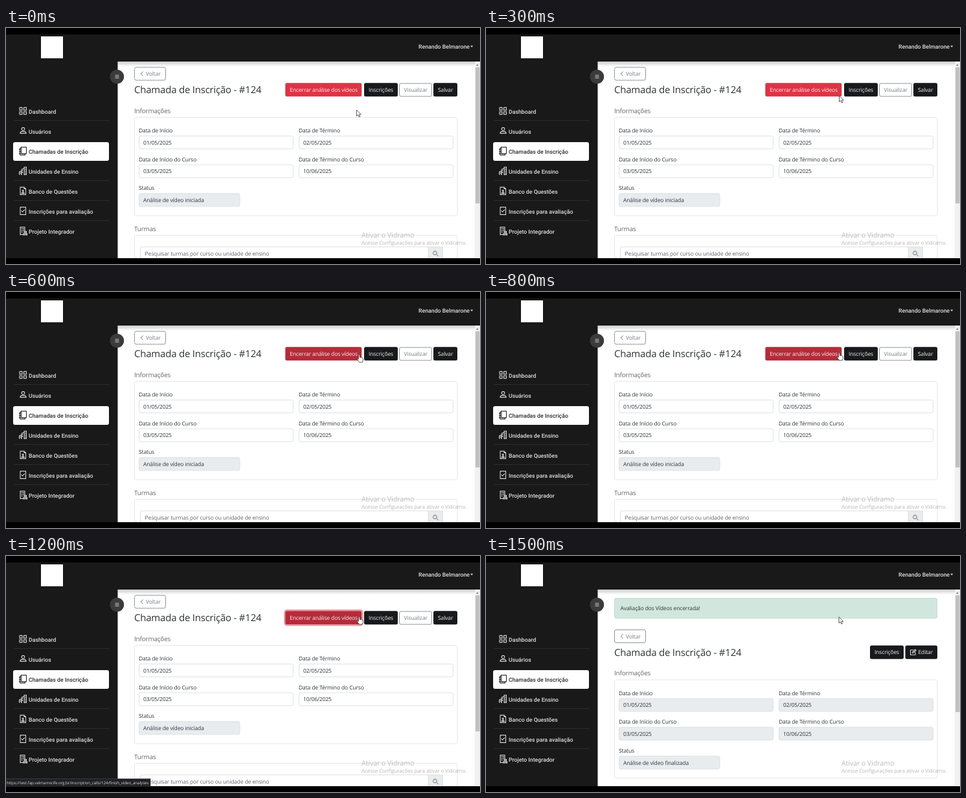
Write an HTML page that moves like this. It is 732x366 px and loops after 2700 ms.

```html
<!DOCTYPE html>
<html lang="pt-BR">
<head>
<meta charset="utf-8">
<style>
html, body { margin: 0; width: 100%; height: 100%; overflow: hidden; background: #000; }
svg { display: block; width: 732px; height: 366px; }
text { font: 8.5px "Open Sans", "Noto Sans", sans-serif; letter-spacing: -.015em; fill: #2f3337; text-rendering: geometricPrecision; white-space: pre; }
.nav text, .user { font: 500 8.75px Roboto, "Liberation Sans", sans-serif; letter-spacing: 0; fill: #e0e0e0; }
.nav text.on { fill: #2a2a2a; }
.icon { fill: none; stroke: #d4d4d4; stroke-width: 1.1; stroke-linejoin: round; stroke-linecap: round; }
.icon.on { stroke: #2a2a2a; }
.icon.thin { stroke: #666; stroke-width: .9; }
.cursor { fill: #fff; stroke: #333; stroke-width: .8; stroke-linejoin: round; }
</style>
</head>
<body>
<svg id="stage" viewBox="0 0 732 366"></svg>
<script>
const text = (x, y, s, attrs = '') => `<text x="${x}" y="${y}" ${attrs}>${s}</text>`;
const rect = (x, y, w, h, fill, attrs = '') =>
  `<rect x="${x}" y="${y}" width="${w}" height="${h}" fill="${fill}" ${attrs}/>`;
const path = (d, attrs = '') => `<path d="${d}" ${attrs}/>`;
const styled = css => `style="${css}"`;

const button = (x, y, w, label, fill, pad = 7) =>
  rect(x, y, w, 21, fill, 'rx="2.5"') + text(x + pad, y + 13.6, label, styled('fill:#f4f4f4'));
const outlined = (x, y, w, label, pad) =>
  rect(x, y, w, 20, '#fff', 'rx="2.5" stroke="#90959a"') + text(x + pad, y + 13, label, styled('fill:#747c83'));
const field = (x, y, w, label, value, locked) =>
  text(x, y, label) +
  rect(x + .5, y + 5.5, w, 20, locked ? '#e9ecef' : '#fff', 'rx="2.5" stroke="#dde1e5"') +
  text(x + 7, y + 18.7, value);

const items = [
  ['Dashboard', 'M1 1h4v4h-4zM7.5 1h4v4h-4zM1 7.5h4v4h-4zM7.5 7.5h4v4h-4z'],
  ['Usuários', 'M6.5 1a2.3 2.3 0 1 1 0 4.6a2.3 2.3 0 1 1 0-4.6zM2 10q0-3 3-3h3q3 0 3 3z'],
  ['Chamadas de Inscrição', 'M3.5.5h8v10h-8zM3 2H1.5v10.5h8V11M.5 4h2M.5 7h2M.5 10h2'],
  ['Unidades de Ensino', 'M.5 12V7.5l3-1V12M4 12V4l4-2V12M8 12V.5h3.5V12zM5.5 5v1M5.5 8v1M9.7 3v1M9.7 6v1M9.7 9v1M2 9v1'],
  ['Banco de Questões', 'M2 .5h6l2.5 2.5v9H2zM8 .5V3h2.5M6.2 5a1 1 0 1 1 0 2a1 1 0 1 1 0-2zM4 10q2.2-3 4.4 0z'],
  ['Inscrições para avaliação', 'M2 .5h8.5v11.5H2zM4 6.2l1.6 1.6L8.7 4.5'],
  ['Projeto Integrador', 'M2 12V.5h7V6M4 3h1M6.5 3h1M4 5.5h1M6.5 5.5h1M4 8h1M2 12h4M8 7h3.5v2H8zM7 10.5h2v2H7zM10.5 10.5h2v2h-2z'],
];

const sidebar = '<g class="nav">' + items.map(([label, d], i) => {
  const y = 130 + 31 * i, on = i === 2 ? 'on' : '';
  return (on ? rect(11, 177, 148, 29, '#fff', 'rx="3"') : '') +
    (i === 1 || i === 2 || i === 6 ? '' : rect(13, y + 13, 146, 1, '#2d2d2d')) +
    path(d, `class="icon ${on}" transform="translate(20 ${y - 7.6})"`) +
    text(35, y + 3.3, label, `class="${on}"`);
}).join('') + '</g>';

const frame =
  rect(0, 0, 732, 366, '#000') +
  rect(0, 10, 732, 347, '#191919') +
  rect(54, 13, 34, 34, '#fff') +
  text(637, 32, 'Renando Belmarone', 'class="user"') +
  path('M717 27.5h4.4l-2.2 2.6z', 'fill="#ddd"') +
  sidebar +
  rect(172.5, 52, 559.5, 305, '#fff');

// Soft shadow the header casts on the page.
const shadow =
  '<linearGradient id="shade" x2="0" y2="1"><stop stop-opacity=".2"/><stop offset="1" stop-opacity="0"/></linearGradient>' +
  rect(172.5, 52, 551.5, 8, 'url(#shade)');

const scrollbar = bottom =>
  rect(724, 52, 8, 305, '#f1f1f1') +
  path('M726 58.5l2-2.5 2 2.5z', 'fill="#777"') +
  rect(725, 61, 6.5, bottom - 61, '#c1c1c1');

const toggle =
  '<circle cx="171.4" cy="75.5" r="10.8" fill="#3b3b3b"/>' +
  path('M168.5 73.3h6M168.5 75.5h6M168.5 77.7h6', 'stroke="#ccc" stroke-width=".9"');

const form = (status, locked) =>
  outlined(198.5, 61, 48, 'Voltar', 17.5) +
  path('M211.3 67.8l-3 3.2 3 3.2', 'class="icon thin"') +
  text(198, 101, 'Chamada de Inscrição - #124', styled('font-size:15px')) +
  text(198, 131.8, 'Informações', styled('font-size:9.9px;fill:#666')) +
  rect(198.5, 138.5, 498.5, 152.5, '#fff', 'rx="2.5" stroke="#e6e6e6"') +
  field(205, 162, 238, 'Data de Início', '01/05/2025', locked) +
  field(452, 162, 238, 'Data de Término', '02/05/2025', locked) +
  field(205, 206.6, 238, 'Data de Início do Curso', '03/05/2025', locked) +
  field(452, 206.6, 238, 'Data de Término do Curso', '10/06/2025', locked) +
  field(205, 251.3, 155.5, 'Status', status, true);

const editView = (hover, ring) =>
  scrollbar(272) +
  form('Análise de vídeo iniciada', false) +
  rect(430.3, 84, 120.4, 23.4, 'none', `rx="3.5" stroke="#e35d6a" stroke-width="2" opacity="${ring * .65}"`) +
  button(431.3, 85.2, 118, 'Encerrar análise dos vídeos', hover ? '#b52b3a' : '#dc3545') +
  button(553, 85.2, 52, 'Inscrições', '#17191c') +
  outlined(607.5, 86, 50, 'Visualizar', 7) +
  button(660, 85.2, 37, 'Salvar', '#17191c') +
  text(198, 314.8, 'Turmas', styled('font-size:9.9px;fill:#666')) +
  rect(198.5, 321.5, 498.5, 60, '#fff', 'rx="2.5" stroke="#e6e6e6"') +
  rect(207.5, 339.5, 467, 20, '#fff', 'rx="2.5" stroke="#dde1e5"') +
  rect(652, 339.5, 22.5, 20, '#e9ecef', 'stroke="#dde1e5"') +
  text(214.5, 353, 'Pesquisar turmas por curso ou unidade de ensino', styled('fill:#5f656b')) +
  path('M662.5 346a2.9 2.9 0 1 1 0 5.8a2.9 2.9 0 1 1 0-5.8zM664.7 351l2.8 2.8', 'class="icon thin"');

const doneView =
  scrollbar(242) +
  rect(198.5, 65.5, 498, 31, '#d1e7dd', 'rx="2.5" stroke="#bfdccf"') +
  text(207.5, 84, 'Avaliação dos Vídeos encerrada!') +
  `<g transform="translate(0 53.5)">${form('Análise de vídeo finalizada', true)}` +
  button(593, 85.2, 52, 'Inscrições', '#17191c') +
  button(647.5, 85.2, 49.5, 'Editar', '#17191c', 20) +
  path('M660 92.3h-4.5v7.5h7.5V95.5M658.3 97l.5-1.7 4-4 1.2 1.2-4 4z', 'class="icon"') +
  '</g>';

const overlay =
  rect(0, 357, 732, 9, '#000') +
  text(549, 325, 'Ativar o Vidramo', styled('font-size:10.8px;fill:#bbb')) +
  text(549, 336, 'Acesse Configurações para ativar o Vidramo.', styled('font-size:8.1px;fill:#b8b8b8'));

const statusBar = opacity => `<g opacity="${opacity}">` +
  rect(-.5, 345.5, 223.5, 11.5, '#202124', 'stroke="#45474a" stroke-width=".7"') +
  text(1, 353.7, 'https://test.fap.velmarrecife.org.br/inscription_calls/124/finish_video_analyses',
    styled('font-size:6.25px;fill:#d5d5d5')) + '</g>';

const arrow = 'M0 0V9.6L2.2 7.6 3.8 11 5.3 10.3 3.8 7H6.8Z';
const hand = 'M2 1Q3-.6 4 1V4.5Q5 3.5 5.8 4.8Q6.8 4 7.5 5.3Q9 4.8 9 6.5V9L8 12H3.2L.3 8Q-.4 6.5 1 6.6L2 7.5Z';
const cursor = (shape, x, y) => path(shape, `class="cursor" transform="translate(${x} ${y})"`);
const clamp = v => Math.max(0, Math.min(1, v));

function pointer(t) {
  if (t >= 1400) return cursor(arrow, 545, 94.5);
  if (t >= 400) return cursor(hand, 542.3, 100 - 6 * clamp((t - 400) / 400));
  const p = t / 300;
  return cursor(arrow, 541.5 + 4 * p, 127 - 22 * (1 - (1 - p) ** 1.5));
}

function draw(t) {
  const done = t >= 1400;
  const view = done ? doneView : editView(t >= 400, clamp((t - 900) / 200));
  const link = !done && t >= 1000 ? statusBar(clamp((t - 900) / 200)) : '';
  stage.innerHTML = frame + view + shadow + toggle + overlay + link + pointer(t);
}

const stage = document.getElementById('stage');
const start = performance.now();
let last = -1;
function tick() {
  const t = Math.floor((performance.now() - start) % 2700 / 100) * 100;
  if (t !== last) draw(last = t);
  requestAnimationFrame(tick);
}
tick();
</script>
</body>
</html>
```
